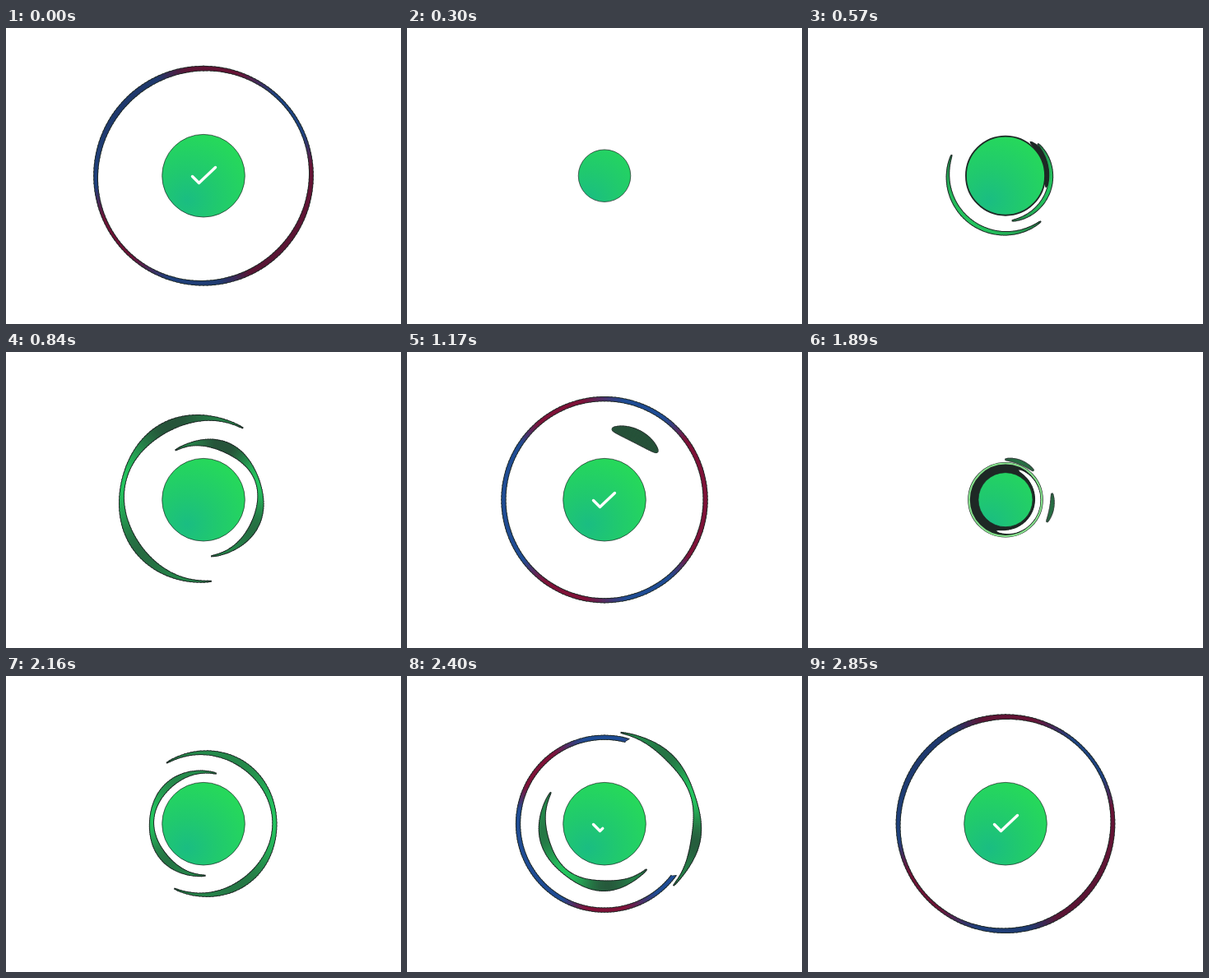
An HTML page with a canvas for the animation above (2.88 s loop, 480x360 px).

```html
<!DOCTYPE html>
<html lang="en">
<head>
<meta charset="utf-8">
<title>Success loop</title>
<style>
  html, body { margin: 0; width: 100%; height: 100%; overflow: hidden; background: #fff; }
  canvas { display: block; width: 480px; height: 360px; }
</style>
</head>
<body>
<canvas id="stage" width="480" height="360"></canvas>
<script>
const ctx = document.getElementById('stage').getContext('2d');
const CYCLE = 1440, STEP = 30, CX = 240, CY = 179.7, RAD = Math.PI / 180;
const INK = [30, 40, 37], WHITE = [255, 255, 255];
const GREEN = [36, 196, 94], MOSS = [38, 84, 58];
const BLUE = [31, 76, 148], RED = [126, 18, 56], NIGHT = [30, 26, 46];

const clamp = x => Math.min(1, Math.max(0, x));
const ramp = (x, a, b) => { const u = clamp((x - a) / (b - a)); return u * u * (3 - 2 * u); };
const mix = (a, b, u) => a.map((v, i) => v + (b[i] - v) * u);
const rgb = c => `rgb(${c.map(Math.round)})`;
const cosDeg = a => Math.cos(a * RAD);
const bow = (u, power) => Math.pow(Math.max(0, Math.sin(Math.PI * u)), power);

// Cosine ease; a skew under 1 hurries the start, over 1 holds it back.
const swing = (t, begin, span, skew) =>
  .5 - .5 * Math.cos(Math.PI * Math.pow(clamp((t - begin) / span), skew));

// Two trails run clockwise: the head leaves first and the tail catches up.
const OUTER = {
  end: 1100, radius: 57, growth: .109, lean: -.3, bulk: 0,
  head: t => -25 + 800 * swing(t, 360, 660, .9),
  tail: t => -12 + 790 * swing(t, 400, 740, 1.15)
};
const INNER = {
  end: 1240, radius: 49, growth: .052, lean: .4, bulk: 11,
  head: t => -95 + 775 * swing(t, 350, 850, .85),
  tail: t => -95 + 775 * swing(t, 390, 905, 1.12)
};

const discRadius = t => 50.3 - 25 * ramp(t, 200, 350) * (1 - ramp(t, 350, 620));
const haloRadius = t => 44.2 + .045 * (t - 450);
const ringRadius = t => 137 - 29.4 * Math.exp((960 - t) / 230);

const along = (count, point) => Array.from({ length: count + 1 }, (_, i) => point(i / count));

function polar(angle, radius) {
  return [CX + radius * cosDeg(angle), CY + radius * Math.sin(angle * RAD)];
}

// Ribbon through points {a: angle, r: radius, w: width, c: colour} with an optional dark rim.
function ribbon(points, rim = .5) {
  for (const grow of rim ? [rim, -rim] : [0]) {
    for (let i = 0; i < points.length - 1; i++) {
      const p = points[i], q = points[i + 1];
      const hp = p.w / 2 + grow, hq = q.w / 2 + grow;
      if (Math.max(p.w, q.w) < .5 || hp + hq <= 0) continue;
      const lap = (q.a - p.a) * .2;
      ctx.fillStyle = rgb(grow > 0 ? INK : p.c);
      ctx.beginPath();
      ctx.moveTo(...polar(p.a - lap, p.r + hp));
      ctx.lineTo(...polar(q.a + lap, q.r + hq));
      ctx.lineTo(...polar(q.a + lap, q.r - hq));
      ctx.lineTo(...polar(p.a - lap, p.r - hp));
      ctx.fill();
    }
  }
}

function trail(swirl, t) {
  if (t < 420 || t >= swirl.end) return;
  const tail = swirl.tail(t), head = swirl.head(t);
  const r = swirl.radius + swirl.growth * (t - 450);
  const late = ramp(t, 900, 1170);
  const glow = (.3 + .7 * ramp(t, 440, 560)) * (1 - ramp(t, 960, 1170));
  const base = 5 + swirl.bulk * late;
  const lobe = 8 * ramp(t, 560, 840) * (1 - late);
  ribbon(along(90, u => {
    const twist = Math.sin(2 * Math.PI * u) ** 2 * (1 + swirl.lean * (1 - 2 * u));
    const w = 1 + (base - 1 + lobe * twist) * bow(u, .55);
    const light = glow * clamp(1 - lobe * twist / 9) * bow(u, .5);
    return { a: tail + (head - tail) * u, r, w, c: mix(MOSS, GREEN, light) };
  }));
}

function ring(phase) {
  const t = phase < 400 ? phase + CYCLE : phase;
  if (t < 890 || t > 1690) return;
  const edge = ringRadius(t), turn = (t - CYCLE) * .115;
  const base = (3 + 2.2 * ramp(t, 890, 950)) * (1 - ramp(t, 1570, 1690));
  const lobe = 1.5 * ramp(t, 1200, 1440) + 2.5 * ramp(t, 1480, 1660);
  const dim = .28 * ramp(t, 1180, 1440) + .35 * ramp(t, 1440, 1660);
  const tail = OUTER.tail(t), length = OUTER.head(t) - tail;
  ribbon(along(180, u => {
    const a = u * 360, wave = cosDeg(2 * (a - 52));
    const hue = cosDeg(a - turn - 28) + 1.2 * cosDeg(3 * (a - turn - 29));
    const past = ((a - tail) % 360 + 360) % 360;
    const hidden = t < OUTER.end && past > 4 && past < length - 4;
    const w = hidden ? 0 : Math.max(0, base + lobe * wave);
    const c = mix(mix(BLUE, RED, clamp(.5 + hue)), NIGHT, clamp(dim * (1 + .4 * wave)));
    return { a, r: edge - w / 2, w, c };
  }));
}

function circle(r, fill, stroke, width) {
  ctx.beginPath();
  ctx.arc(CX, CY, r, 0, 2 * Math.PI);
  if (fill) { ctx.fillStyle = fill; ctx.fill(); }
  if (stroke) { ctx.strokeStyle = stroke; ctx.lineWidth = width; ctx.stroke(); }
}

function halo(t) {
  if (t < 400 || t > 540) return;
  const r = haloRadius(t), gap = Math.max(0, r - discRadius(t));
  circle(r, rgb(INK));
  ribbon(along(60, u => {
    const w = gap * .6 * bow(u, .45);
    return { a: -66 + 172 * u, r: r - 1.5 - gap * .3, w, c: WHITE };
  }), 0);
  circle(r, null, rgb(INK), 3.2);
  circle(r, null, '#86e08c', 2);
}

function shadow(t) {
  if (t < 480 || t > 630) return;
  ribbon(along(40, u => ({ a: -54 + 70 * u, r: 51, w: 7 * bow(u, .5), c: INK })));
}

function disc(t) {
  const fill = ctx.createRadialGradient(220, 210, 0, 220, 210, 82);
  fill.addColorStop(0, '#1abd82');
  fill.addColorStop(.45, '#20c96e');
  fill.addColorStop(1, '#26d85b');
  circle(discRadius(t), fill, rgb(INK), t > 450 && t < 640 ? 1.8 : .7);
}

function check(t) {
  if (t > 270 && t < 880) return;
  const drawn = t < 400 ? 1 : 1 - (1 - clamp((t - 880) / 500)) ** 3;
  const short = 8 * Math.SQRT2, long = Math.hypot(20, 19);
  const length = drawn * (short + long);
  const first = clamp(length / short), second = clamp((length - short) / long);
  const scale = discRadius(t) / 50.3;
  ctx.save();
  ctx.translate(CX, CY);
  ctx.scale(scale, scale);
  ctx.beginPath();
  ctx.moveTo(-13.5, .8);
  ctx.lineTo(-13.5 + 8 * first, .8 + 8 * first);
  if (second > 0) ctx.lineTo(-5.5 + 20 * second, 8.8 - 19 * second);
  ctx.lineWidth = 3.4;
  ctx.lineCap = ctx.lineJoin = 'round';
  ctx.strokeStyle = '#fff';
  ctx.stroke();
  ctx.restore();
}

function draw(time) {
  const t = Math.floor(time / STEP) * STEP % CYCLE;
  ctx.fillStyle = '#fff';
  ctx.fillRect(0, 0, 480, 360);
  ring(t);
  shadow(t);
  trail(OUTER, t);
  trail(INNER, t);
  halo(t);
  disc(t);
  check(t);
}

const start = performance.now();
function tick() {
  draw(Math.max(0, performance.now() - start));
  requestAnimationFrame(tick);
}
tick();
</script>
</body>
</html>
```
